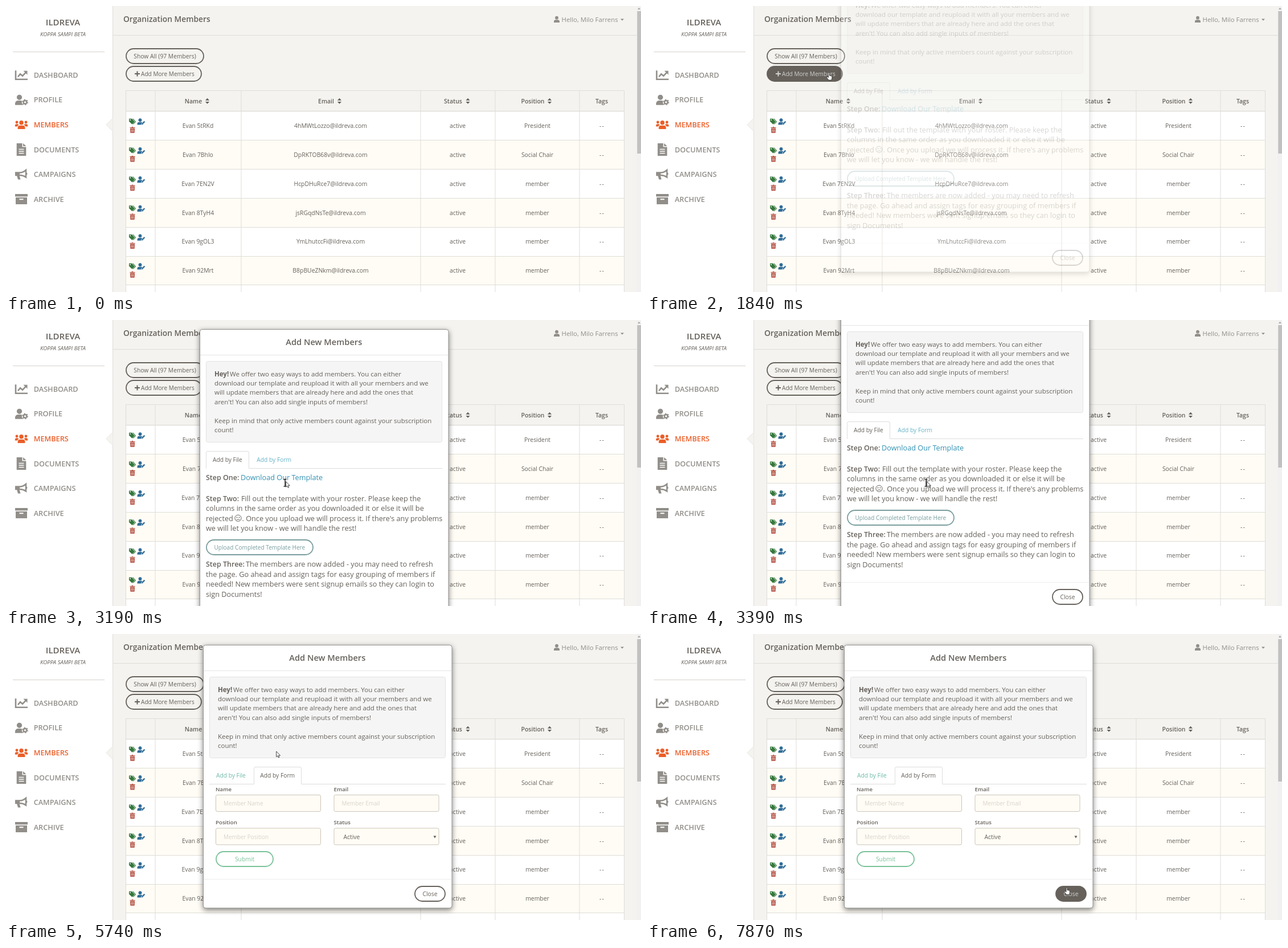
Animation of 1115x502 px, one loop 8 s. Source, as an HTML page:

```html
<!DOCTYPE html>
<html lang="en">
<head>
<meta charset="utf-8">
<title>Organization Members</title>
<style>
  html, body { margin: 0; width: 100%; height: 100%; overflow: hidden; background: #f4f3ef; }
  svg { display: block; width: 100%; height: 100%; font-family: "Open Sans", "Noto Sans", sans-serif; }
  text { white-space: pre; }
  .sheet { filter: drop-shadow(0 3px 5px rgba(0, 0, 0, .5)); }
</style>
</head>
<body>
<svg id="stage" viewBox="0 0 1115 502" fill="#66615b"></svg>
<script>
const LOOP = 8000;
const INK = '#66615b', LINE = '#dfddd8', LINK = '#68b3c8', LINK_HOVER = '#3091b2', GREEN = '#7ac29a';

// ---- drawing helpers ----
const text = (x, y, str, size, extra = '') =>
  `<text x="${x}" y="${y}" font-size="${size}" ${extra}>${str}</text>`;
const mid = (x, y, str, size, extra = '') => text(x, y, str, size, `text-anchor="middle" ${extra}`);
const bold = 'font-weight="600"';
const rect = (x, y, w, h, fill, extra = '') =>
  `<rect x="${x}" y="${y}" width="${w}" height="${h}" fill="${fill}" ${extra}/>`;
const path = (d, extra = '') => `<path d="${d}" ${extra}/>`;
const rule = (d, color = LINE) => path(d, `fill="none" stroke="${color}"`);
const disc = (x, y, r, extra = '') => `<circle cx="${x}" cy="${y}" r="${r}" ${extra}/>`;
const at = (x, y, body, extra = '') => `<g transform="translate(${x} ${y})" ${extra}>${body}</g>`;
const pill = (x, y, w, color, id = '', h = 28) =>
  rect(x + 1, y + 1, w - 2, h - 2, 'none', `${id && `id="${id}"`} rx="${h / 2 - 1}" stroke="${color}" stroke-width="1.8"`);

// ---- icons, centred on 0,0 ----
const stroke = w => `fill="none" stroke="currentColor" stroke-width="${w}"`;
const fill = 'fill="currentColor"';
const person = disc(0, -2.8, 2.9, fill) + path('M-5 5.6V4A3.4 3.4 0 0 1-1.6.7H1.6A3.4 3.4 0 0 1 5 4V5.6Z', fill);
const icons = {
  chart: path('M-10-8V7.5H11', stroke(2.6)) + path('M-6 3-2-2 2 1.5 8-5', stroke(2.6)) + path('M3.5-7.5H10.5V-.5Z', fill),
  userCog: disc(-3.5, -4.5, 4.6, fill) + path('M-11 9V6A5 5 0 0 1-6 1.2H-1A5 5 0 0 1 1 2Q0 6 3 9Z', fill) +
    disc(6.5, 4, 2.9, stroke(2.4)) + disc(6.5, 4, 4.6, stroke(1.6) + ' stroke-dasharray="2.2 2.6"'),
  users: disc(0, -3.6, 3.7, fill) + disc(-8, -4.4, 2.4, fill) + disc(8, -4.4, 2.4, fill) +
    path('M-6.4 7.5V5.4A4 4 0 0 1-2.4 1.4H2.4A4 4 0 0 1 6.4 5.4V7.5Z', fill) +
    path('M-11.2 3V1A2.4 2.4 0 0 1-8.8-1.2H-6.4L-4.6-.2-7.4 3ZM11.2 3V1A2.4 2.4 0 0 0 8.8-1.2H6.4L4.6-.2 7.4 3Z', fill),
  file: path('M-8.3-11H1.5V-4.5H8.3V11H-8.3ZM3-11 8.3-6H3Z', fill) + path('M-4.5-.5H4.5M-4.5 3H4.5M-4.5 6.5H4.5', 'stroke="#fff" stroke-width="1.5"'),
  horn: path('M-9.8-3H-3Q3-3 8-7.5V5Q3 1.5-3 1.5H-9.8Z', stroke(2.5)) + path('M-8 2H-3.5L-1.5 9H-6ZM8.5-3A2 2 0 0 1 8.5 1Z', fill) + rect(-10, -3, 7, 4.5, 'currentColor'),
  archive: path('M-11-9H11V-4.5H-11ZM-10-3H10V9H-10Z', fill) + rect(-3.5, -.8, 7, 2, '#fff'),
  person,
  tags: path('M-6-5H-1L4 .4-.6 5-6-.2ZM0-5H1.4L6.2.4 1.6 5 .8 4.2 4.8.4Z', fill) + disc(-3.8, -2.8, 1, 'fill="#fff"'),
  userEdit: at(-2, 0, person) + path('M.2 5.8.6 3.2 5-1.4 7 .6 2.6 5.2Z', 'fill="currentColor" stroke="#fff" stroke-width=".7"'),
  trash: path('M-4.6-4.6H-1.6L-1-5.4H1L1.6-4.6H4.6V-3.4H-4.6ZM-4-2.7H4L3.6 5.2H-3.6Z', fill) +
    path('M-1.8-1.2V3.8M0-1.2V3.8M1.8-1.2V3.8', 'stroke="#fff" stroke-width=".7"'),
  sort: path('M-3.6-1.1 0-5 3.6-1.1ZM-3.6 1.1 0 5 3.6 1.1Z', fill),
};
const icon = (name, x, y, color) => at(x, y, icons[name], `color="${color}"`);

// ---- page behind the dialog ----
function sidebar() {
  const items = [['chart', 'DASHBOARD'], ['userCog', 'PROFILE'], ['users', 'MEMBERS'],
    ['file', 'DOCUMENTS'], ['horn', 'CAMPAIGNS'], ['archive', 'ARCHIVE']];
  return rect(0, 0, 187, 502, '#fff') + rule('M187.5 0V502') +
    path('M187.5 197 176 208.5 187.5 220Z', 'fill="#f4f3ef"') + rule('M187.5 197 176 208.5 187.5 220', '#e8e6e1') +
    mid(100, 33.5, 'ILDREVA', 15, bold) +
    mid(100, 53, 'KOPPA SAMPI BETA', 9.7, 'font-style="italic"') + rule('M12 80.5H173', '#d4d2cd') +
    items.map(([name, label], i) => {
      const y = 121.3 + i * 43.55, color = name === 'users' ? '#eb5e28' : '#918e89';
      return icon(name, 27, y, color) + text(48.7, y + 4.6, label, 12.7, `${bold} fill="${color}"`);
    }).join('');
}

function table() {
  const people = [
    ['Evan 5tRKd', '4hMWtLozzo', 'President'], ['Evan 7Bhlo', 'DpRKTOB68v', 'Social Chair'],
    ['Evan 7EN2V', 'HcpDHuRce7', 'member'], ['Evan 8TyH4', 'jsRGqdNsTe', 'member'],
    ['Evan 9gOL3', 'YmLhutccFi', 'member'], ['Evan 92Mrt', 'B8pBUeZNkm', 'member']];
  const heads = [['Name', 329, 353.5], ['Email', 562, 585.5], ['Status', 785, 811], ['Position', 925, 954.5], ['Tags', 1046]];
  const top = 185, pitch = 50.8;
  let out = rect(210, top, 876, 320, '#fff');
  people.forEach(([name, mail, role], i) => {
    const y = top + i * pitch, base = y + 29.2;
    if (i % 2) out += rect(210, y, 876, pitch, '#fffcf5');
    out += icon('tags', 222, y + 17.8, '#34773c') + icon('userEdit', 237.5, y + 18, '#2f6c98') + icon('trash', 222, y + 32.5, '#b1493b');
    [[337, name], [570, mail + '@ildreva.com'], [793, 'active'], [933, role]]
      .forEach(([x, str]) => out += mid(x, base, str, 10.4));
    out += mid(1046.5, base, '--', 10.4, 'letter-spacing="1.2"');
  });
  for (let i = 1; i < 7; i++) out += rule(`M210 ${Math.floor(top + i * pitch) + .5}H1086`);
  out += rule('M210 184.7H1086', '#d6d4cf');
  heads.forEach(([label, x, sx]) => out += mid(x, 170.8, label, 10.5, bold) + (sx ? icon('sort', sx, 166.8, INK) : ''));
  return out + rule('M210.5 510V148.5H1085.5V510') + rule([262, 413, 728, 859, 1007].map(x => `M${x} 148V502`).join(''));
}

const page = () => sidebar() + rule('M188 51.5H1108') +
  text(206, 28, 'Organization Members', 13.8, bold) +
  icon('person', 967, 23.5, '#918e89') + text(975.5, 27.5, 'Hello, Milo Farrens', 11.4, 'fill="#918e89"') +
  path('M1079 22.5H1085L1082 25.7Z', 'fill="#918e89"') +
  pill(210, 74, 138, INK) + mid(279, 91.8, 'Show All (97 Members)', 10.3) +
  pill(210, 105, 134, INK, 'addPill') +
  `<g id="addLabel">${path('M226 119H235M230.5 114.5V123.5', 'stroke="currentColor" stroke-width="2"')}` +
  text(237, 122.8, 'Add More Members', 10.1, fill) + '</g>' + table() +
  rect(1107.5, 0, 7.5, 502, '#f1f1f1') + rect(1108.3, 9, 6.7, 250, '#c1c1c1') + path('M1109 6H1114L1111.5 3Z', 'fill="#a3a3a3"');

// ---- dialog ----
const lines = (x, y, step, size, rows) => rows.map((row, i) => text(x, y + i * step, row, size)).join('');

function filePane() {
  const size = 12.7, lead = 17.6;
  const heading = (y, label) => text(11, y, label, 12.5, bold);
  const step = (y, label, x, rest) => heading(y, label) + text(x, y, rest, size);
  const face = disc(67.5, 331.3, 5.6, stroke(1)) + disc(65.5, 330, .9) + disc(69.5, 330, .9) +
    path('M64.5 334.6Q67.5 332.4 70.5 334.2', stroke(1));
  return heading(264.6, 'Step One:') + text(72, 264.6, 'Download Our Template', size, 'id="link"') +
    step(301, 'Step Two:', 73, 'Fill out the template with your roster. Please keep the') +
    text(11, 301 + lead, 'columns in the same order as you downloaded it or else it will be', size) +
    text(11, 301 + 2 * lead, 'rejected', size) + `<g color="${INK}">${face}</g>` +
    text(74.5, 301 + 2 * lead, ". Once you upload we will process it. If there's any problems", size) +
    text(11, 301 + 3 * lead, 'we will let you know - we will handle the rest!', size) +
    pill(11, 368.5, 189, '#7a9e9f') + mid(105.3, 386, 'Upload Completed Template Here', 10.1, 'fill="#7a9e9f"') +
    step(416.6, 'Step Three:', 81, 'The members are now added - you may need to refresh') +
    lines(11, 416.6 + lead, lead, size, ['the page. Go ahead and assign tags for easy grouping of members if',
      'needed! New members were sent signup emails so they can login to', 'sign Documents!']);
}

function formPane() {
  const field = (x, y, label, hint) => text(x, y, label, 9.7, bold) +
    rect(x + .5, y + 7, 184, 29, '#fffcf5', 'rx="2.5" stroke="#ccc5b9"') +
    (hint ? text(x + 14, y + 25.6, hint, 9.9, 'fill="#d8d4cb"') : text(x + 17, y + 25.6, 'Active', 10.4) +
      path(`M${x + 175} ${y + 20.3}h5l-2.5 4.2Z`));
  return field(22, 256, 'Name', 'Member Name') + field(229.5, 256, 'Email', 'Member Email') +
    field(22, 314.4, 'Position', 'Member Position') + field(229.5, 314.4, 'Status') +
    pill(22, 361.5, 102, GREEN) + mid(73, 379.2, 'Submit', 10.3, `fill="${GREEN}"`);
}

const dialog = () => rect(.5, 0, 436.5, 546, '#fff', 'id="sheet" class="sheet" rx="4" stroke="#949391"') +
  mid(218.3, 27.3, 'Add New Members', 14.65, bold) + rule('M1 45H436.5', '#e5e5e5') +
  rect(11.5, 56, 414, 142, '#f5f5f5', 'rx="3" stroke="#e3e3e3"') +
  text(26, 82, 'Hey!', 11.5, 'font-weight="700"') + text(53, 82, 'We offer two easy ways to add members. You can either', 11.55) +
  lines(26, 98.4, 16.4, 11.5, ['download our template and reupload it with all your members and we',
    'will update members that are already here and add the ones that', "aren't! You can also add single inputs of members!", '',
    'Keep in mind that only active members count against your subscription', 'count!']) +
  '<path id="tabs" fill="none" stroke="#dddddd"/>' +
  text(23, 232.8, 'Add by File', 10.25, 'id="fileTab"') + text(100.3, 232.8, 'Add by Form', 10.25, 'id="formTab"') +
  `<g id="filePane">${filePane()}</g><g id="formPane">${formPane()}</g>` +
  `<g id="foot">${rule('M1-25H436.5', '#ececec')}${pill(371, -13.5, 55, INK, 'closePill')}` +
  `${mid(398.5, 4.1, 'Close', 10.3, 'id="closeLabel"')}</g>`;

const outline = 'fill="#fff" stroke="#333" stroke-width=".9" stroke-linejoin="round"';
const arrow = path('M0 0V9.6L2.2 7.7 3.7 11 5.2 10.3 3.8 7.2H6.8Z', outline);
const hand = path('M-1 6.8V1A1 1 0 0 1 1 1V4.6L4.4 5.3A1.4 1.4 0 0 1 5.4 6.7V9.4L4.4 12.6H-.4L-3.8 8.4A1 1 0 0 1-2.2 7.1L-1 8Z', outline);
const beam = path('M-2 1H3M.5 1V13.5M-2 13.5H3', 'fill="none" stroke="#333" stroke-width="1.6"') + at(2, 5, arrow);

const stage = document.getElementById('stage');
stage.innerHTML = page() + `<g id="dialog">${dialog()}</g>` +
  `<g id="cursor"><g id="arrow">${arrow}</g><g id="hand">${hand}</g><g id="beam">${beam}</g></g>`;
const el = {};
stage.querySelectorAll('[id]').forEach(node => el[node.id] = node);

// ---- motion ----
const clamp = v => Math.min(1, Math.max(0, v));
const smooth = u => u * u * (3 - 2 * u);
const inOut = u => u < .5 ? 4 * u ** 3 : 1 - 4 * (1 - u) ** 3;
// Number of screen updates done by time t, out of n between a and b
const steps = (t, a, b, n) => t < a ? 0 : Math.min(n, 1 + Math.floor((t - a) / (b - a) * (n - 1) + 1e-6));

const moves = [ // start, end, updates, x, y
  [280, 430, 4, 545, 247, u => u], [660, 1010, 8, 319.5, 117.5], [2250, 2500, 5, 490, 256],
  [2700, 2800, 3, 489.5, 278.5], [4330, 5130, 16, 474.7, 206], [7020, 7220, 5, 623.5, 383.5], [7370, 7870, 11, 737, 444.8]];

function pointer(t) {
  let x = 1105, y = 574;
  for (const [a, b, n, tx, ty, ease = smooth] of moves) {
    const u = ease(steps(t, a, b, n) / n);
    x += (tx - x) * u;
    y += (ty - y) * u;
  }
  return [x, y];
}

const set = (node, attrs) => Object.entries(attrs).forEach(([k, v]) => node.setAttribute(k, v));
const show = (node, on) => set(node, { visibility: on ? 'visible' : 'hidden' });

function paintDialog(t, x, y) {
  const form = t >= 5690;
  const n = steps(t, 1650, 2110, 9), tick = 1650 + (n - 1) * 57.5;
  const drop = n === 9 ? 1 : 1 - (1 - clamp((tick - 1758) / 375)) ** 1.7;
  const scroll = 55 * inOut(clamp((steps(t, 3040, 3390, 7) - 1.8) / 5.2));
  const height = form ? 461.5 : 546.5;
  // Whole pixels keep the thin lines crisp
  const top = 19.5 - (form ? 0 : Math.round(136.6 * (1 - drop) + scroll));
  const opacity = n ? clamp((tick - 1785) / 150) : 0;
  set(el.dialog, { transform: `translate(${form ? 346 : 340} ${top})`, opacity });
  show(el.dialog, opacity > 0);
  set(el.sheet, { height });
  set(el.foot, { transform: `translate(0 ${height - 25.5})` });
  set(el.filePane, { display: form ? 'none' : 'inline' });
  set(el.formPane, { display: form ? 'inline' : 'none', opacity: t < 5740 ? .5 : 1 });

  const [l, r] = form ? [89, 173] : [11, 87];
  set(el.tabs, { d: `M11 244H${l + .5}V216.5Q${l + .5} 214 ${l + 3} 214H${r - 3}Q${r - .5} 214 ${r - .5} 216.5V244H426` });
  const onLink = (t >= 2750 && t < 3540) || (t >= 4330 && y > 218 && y < 232);
  const onTab = t >= 4330 && y < 209;
  set(el.link, { fill: onLink ? LINK_HOVER : LINK });
  set(el.fileTab, { fill: form ? '#6fbba8' : INK });
  set(el.formTab, { fill: form ? INK : onTab ? LINK_HOVER : LINK });

  const onClose = form && x > 718 && y > 436;
  set(el.closePill, { fill: onClose ? INK : 'none' });
  set(el.closeLabel, { fill: onClose ? '#d1d0ce' : INK });
  return onClose;
}

function paint(t) {
  const [x, y] = pointer(t);
  const onClose = paintDialog(t, x, y);
  const onAdd = t < 1880 && x < 344 && y > 105 && y < 133;
  set(el.addPill, { fill: onAdd ? INK : 'none' });
  set(el.addLabel, { color: onAdd ? '#d1d0ce' : INK });

  const onText = t >= 2800 && t < 3880;
  set(el.cursor, { transform: `translate(${x.toFixed(2)} ${y.toFixed(2)})` });
  show(el.cursor, t >= 280);
  set(el.hand, { display: onAdd || onClose ? 'inline' : 'none' });
  set(el.beam, { display: onText ? 'inline' : 'none' });
  set(el.arrow, { display: onAdd || onClose || onText ? 'none' : 'inline' });
}

const start = performance.now();
function loop() {
  paint((performance.now() - start) % LOOP);
  requestAnimationFrame(loop);
}
loop();
</script>
</body>
</html>
```
